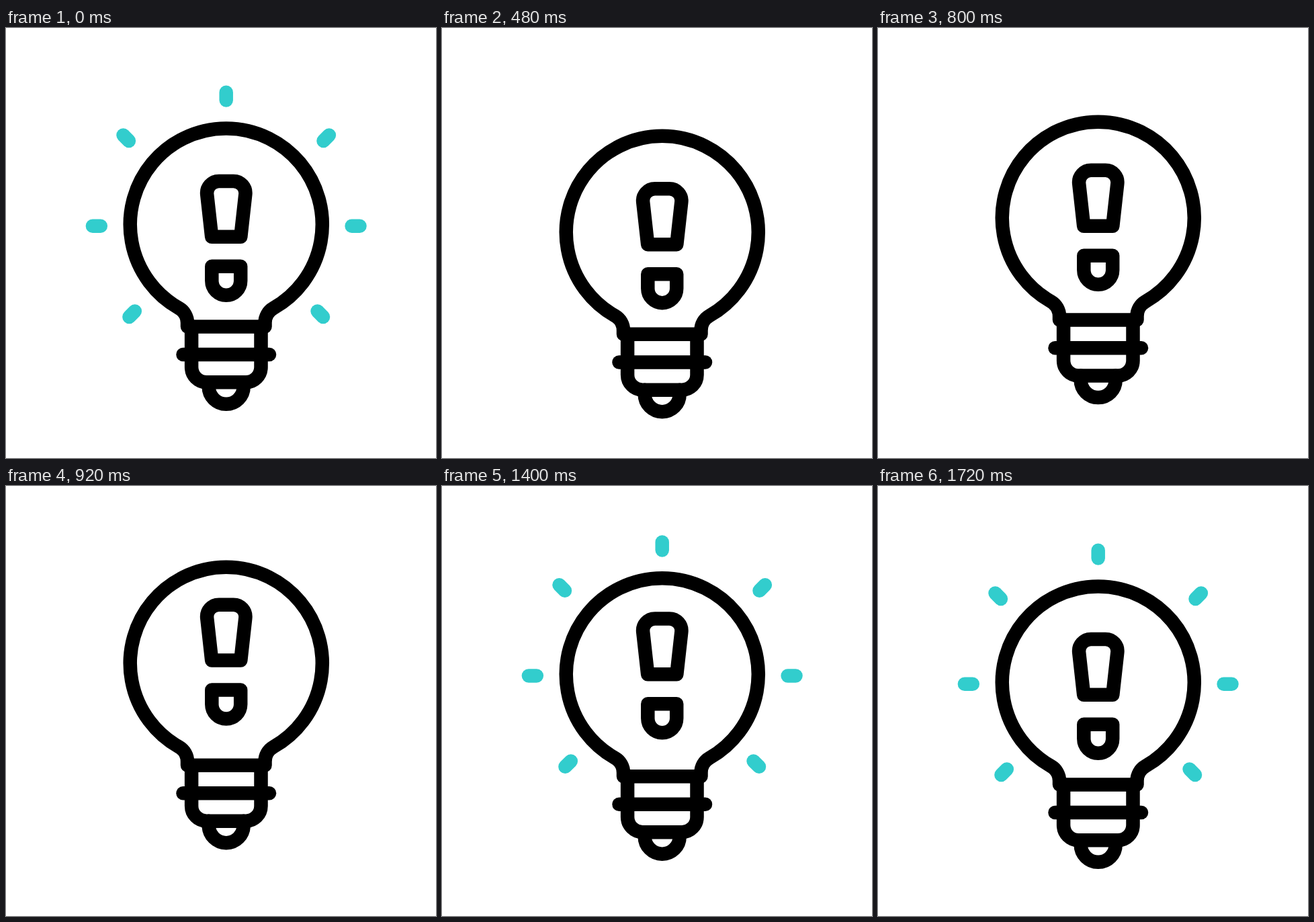
Write an HTML page that moves like this. It is 640 px wide and 640 px high and loops after 1920 ms.

```html
<!DOCTYPE html>
<html lang="en">
<head>
<meta charset="utf-8">
<title>Idea bulb</title>
<style>
  html, body { margin: 0; width: 100%; height: 100%; overflow: hidden; background: #fff; }
  svg { display: block; width: 100vw; height: 100vh; }
  path { fill: none; stroke: #000; stroke-width: 20.5; stroke-linecap: round; stroke-linejoin: round; }
  #rays path { stroke: #32cdcd; }
</style>
</head>
<body>
<svg viewBox="0 0 640 640">
  <g id="bulb">
    <g id="rays"></g>
    <!-- glass -->
    <path d="M270 444.4V438.8C270 429.8 265.3 421.5 257.5 417A143 143 0 1 1 398 417C390.2 421.5 385.5 429.8 385.5 438.8V444.4Z"/>
    <!-- socket -->
    <path d="M276.1 444.4V504.8A22.5 22.5 0 0 0 298.6 527.3H357A22.5 22.5 0 0 0 379.5 504.8V444.4"/>
    <path d="M263.5 486H392"/>
    <path d="M301.7 527.3V533.8A26 26 0 0 0 353.7 533.8V527.3"/>
    <g id="mark">
      <path d="M306.2 310.8L299.2 247.9A17.9 17.9 0 0 1 317 227.9H338.5A17.9 17.9 0 0 1 356.3 247.9L349.3 310.8Z"/>
      <path d="M306.3 354.8H349.2V376.3A21.45 21.45 0 0 1 306.3 376.3Z"/>
    </g>
  </g>
</svg>
<script>
const LOOP = 1920, STEP = 40;
const MID = 327.7, RAY = 11.9;
const $ = id => document.getElementById(id);
const bulb = $('bulb'), mark = $('mark'), rays = $('rays');

// A ray starts at its outer end and points inward
const lines = [];
function addRay(x, y, deg, side) {
  const a = deg * Math.PI / 180;
  const el = document.createElementNS('http://www.w3.org/2000/svg', 'path');
  rays.appendChild(el);
  lines.push({ el, x: MID + side * x, y, dx: side * RAY * Math.cos(a), dy: RAY * Math.sin(a) });
}
addRay(0, 95.7, 90, 1);
for (const side of [-1, 1]) {
  [153.2, 198.8, 144.3].forEach((x, i) => addRay(x, 159.5 + 135.25 * i, 135 + 45 * i, side));
}

// Eased progress from 0 to 1 between two times
function ramp(t, start, end) {
  const x = Math.min(1, Math.max(0, (t - start) / (end - start)));
  return x * x * (3 - 2 * x);
}

const shift = (el, y) => el.setAttribute('transform', `translate(0 ${y.toFixed(3)})`);

function drawRays(t) {
  const shrinking = t < 800;
  const from = shrinking ? 0 : 1 - ramp(t, 1000, 1250);
  const to = shrinking ? 1 - ramp(t, 0, 362) : 1;
  rays.setAttribute('visibility', to - from > 0.001 ? 'visible' : 'hidden');
  for (const { el, x, y, dx, dy } of lines) {
    const point = k => `${(x + dx * k).toFixed(2)} ${(y + dy * k).toFixed(2)}`;
    el.setAttribute('d', `M${point(from)}L${point(to)}`);
  }
}

function render(now) {
  const t = Math.floor((now % LOOP) / STEP) * STEP;
  // dip, leap, settle
  shift(bulb, 12.2 * ramp(t, 0, 570) - 48.2 * ramp(t, 600, 1025) + 36 * ramp(t, 1025, 1640));
  // the mark leaps further than the glass
  shift(mark, 36.6 * (ramp(t, 1080, 1720) - ramp(t, 700, 1080)));
  drawRays(t);
}

function tick() {
  render(performance.now());
  requestAnimationFrame(tick);
}
tick();
</script>
</body>
</html>
```
